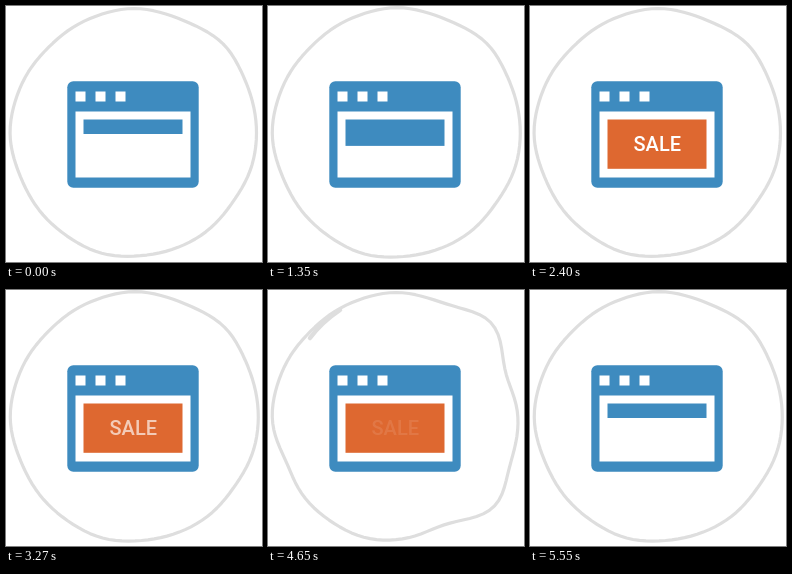
Recreate the animation shown at these times as an HTML page. Size 256 by 256 pixels, loop 5640 ms.

```html
<!DOCTYPE html>
<html lang="en">
<head>
<meta charset="utf-8">
<title>Sale banner</title>
<style>
  html, body { margin: 0; width: 100%; height: 100%; overflow: hidden; background: #fff; }
  svg { display: block; width: 100vw; height: 100vh; }
  text { font: 500 20px Roboto, Inter, sans-serif; text-anchor: middle; fill: #fff; }
</style>
</head>
<body>
<svg viewBox="0 0 256 256">
  <path id="ring" fill="none" stroke="#dedede" stroke-width="3.2" stroke-linejoin="round"/>
  <path id="smudge" fill="none" stroke="#dedede" stroke-width="4.5" stroke-linecap="round" d="M72 20Q54 32 42 48"/>
  <rect x="61.3" y="75.3" width="131.4" height="106.4" rx="6" fill="#3e8bbf"/>
  <rect x="69.5" y="105.5" width="115" height="66" fill="#fff"/>
  <rect class="dot" x="69.5" y="85.5" width="10" height="10"/>
  <rect class="dot" x="89.5" y="85.5" width="10" height="10"/>
  <rect class="dot" x="109.5" y="85.5" width="10" height="10"/>
  <rect id="bar" x="77.5" y="113.5" width="99" height="14.5"/>
  <text id="label" x="127.3" y="145">SALE</text>
</svg>
<script>
const LOOP = 5640;
const BLUE = [62, 139, 191], ORANGE = [222, 104, 48], WHITE = [255, 255, 255];
const $ = id => document.getElementById(id);
const ring = $('ring'), smudge = $('smudge'), bar = $('bar'), label = $('label');
const dots = document.querySelectorAll('.dot');

const lerp = (a, b, k) => a + (b - a) * k;
const mix = (a, b, k) => `rgb(${a.map((v, i) => Math.round(lerp(v, b[i], k)))})`;
const clamp = k => Math.min(1, Math.max(0, k));
const ease = (t, from, to) => (1 - Math.cos(Math.PI * clamp((t - from) / (to - from)))) / 2;
const pulse = (t, from, to) => Math.sin(Math.PI * clamp((t - from) / (to - from)));

// The ring is a circle with soft bumps, each given as [degrees, height].
const soft = [[-45, 3.5], [-90, 2], [35, -2], [105, 2], [157, -1], [180, 1.5], [225, -1.5]];
const rough = [[-45, 8], [-20, -5], [41, 12], [68, -5], [157, -3]];

function bumps(list, deg) {
  return list.reduce((sum, [at, height]) => {
    const gap = ((deg - at + 540) % 360 - 180) / 14;
    return sum + height * Math.exp(-gap * gap);
  }, 0);
}

function outline(roughness, shift, grow) {
  const points = [];
  for (let deg = 0; deg < 360; deg += 3) {
    const r = 122.5 + grow + bumps(soft, deg) + roughness * bumps(rough, deg);
    const a = deg * Math.PI / 180;
    points.push([128 + shift + r * Math.cos(a), 127 + r * Math.sin(a)]);
  }
  return 'M' + points.join('L') + 'Z';
}
const outlines = [outline(0, 0, 0), outline(0, 1, .8), outline(.5, .5, 0), outline(1, 0, 0)];

function draw(t) {
  const pose = Math.floor(t / 150) % 4;
  ring.setAttribute('d', outlines[pose]);
  smudge.setAttribute('opacity', pose === 3 ? 1 : 0);

  const open = ease(t, 1200, 1580) - ease(t, 4780, 5110);
  bar.setAttribute('height', lerp(14.5, 49.3, open));
  bar.setAttribute('fill', mix(BLUE, ORANGE, ease(t, 1560, 1830) - ease(t, 4680, 4920)));

  const blink = .6 * (ease(t, 2400, 3000) - ease(t, 3000, 3600));
  label.setAttribute('opacity', ease(t, 1800, 2115) - blink - ease(t, 4500, 4690));

  dots.forEach((dot, i) => {
    const start = 3600 + (2 - i) * 300;
    dot.setAttribute('fill', mix(WHITE, ORANGE, .9 * pulse(t, start, start + 300)));
  });
}

const begin = performance.now();
function tick() {
  draw((performance.now() - begin) % LOOP);
  requestAnimationFrame(tick);
}
tick();
</script>
</body>
</html>
```
